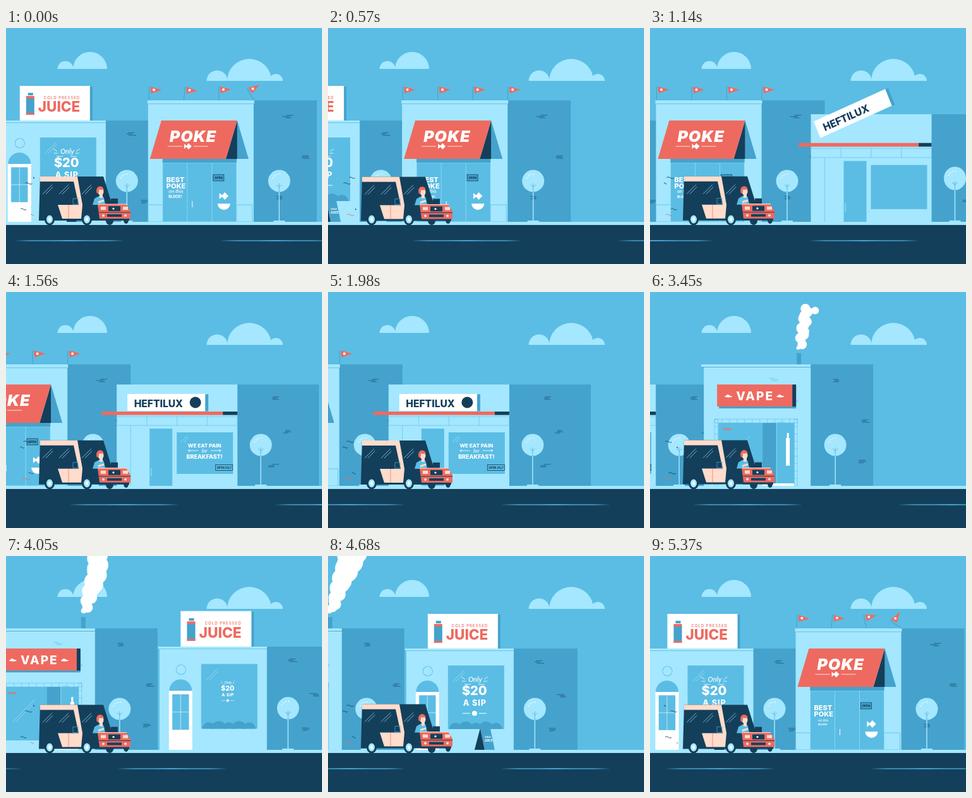
Write an HTML page with a canvas that moves like this. It is 500 px wide and 375 px high and loops after 5400 ms.

```html
<!DOCTYPE html>
<html lang="en">
<head>
<meta charset="utf-8">
<title>Street drive</title>
<style>
html, body { margin: 0; width: 100%; height: 100%; overflow: hidden; background: #5bbde4; }
canvas { display: block; }
</style>
</head>
<body>
<canvas id="stage" width="500" height="375"></canvas>
<script>
const c = document.getElementById('stage').getContext('2d');
const SKY = '#5bbde4', MID = '#45a2cc', PALE = '#a4e7fe', NAVY = '#143f5b',
      RED = '#ee6a60', PEACH = '#ffdccb', WHITE = '#fff';
const LOOP = 5400, SPEED = 1020 / LOOP, BIRTH_X = 323, GROUND = 308;
const SANS = 'Inter, Lato, sans-serif', SCRIPT = 'Lato, sans-serif';

const mod = (a, n) => ((a % n) + n) % n;
const clamp = v => Math.max(0, Math.min(1, v));
const part = (t, start, dur) => clamp((t - start) / dur);
const ease = p => 1 - (1 - p) ** 3;
const back = p => 1 + 2.7 * (p - 1) ** 3 + 1.7 * (p - 1) ** 2;
const pop = (t, start, dur) => t < start ? 0 : back(part(t, start, dur));
const random = seed => () => mod(Math.sin(seed++ * 12.9898) * 43758.5453, 1);

function rect(x, y, w, h, color) { c.fillStyle = color; c.fillRect(x, y, w, h); }
function frame(x, y, w, h, color) { c.strokeStyle = color; c.lineWidth = .8; c.strokeRect(x, y, w, h); }
function poly(color, ...p) {
  c.beginPath();
  for (let i = 0; i < p.length; i += 2) c.lineTo(p[i], p[i + 1]);
  c.fillStyle = color; c.fill();
}
function line(color, w, x1, y1, x2, y2) {
  c.beginPath(); c.moveTo(x1, y1); c.lineTo(x2, y2);
  c.strokeStyle = color; c.lineWidth = w; c.stroke();
}
function oval(x, y, rx, ry, color, from = 0, to = 2 * Math.PI) {
  c.beginPath(); c.ellipse(x, y, rx, ry, 0, from, to); c.fillStyle = color; c.fill();
}
const dot = (x, y, r, color) => oval(x, y, r, r, color);
const dome = (x, y, r, color) => oval(x, y, r, r, color, Math.PI);
const bowl = (x, y, r, color) => oval(x, y, r, r, color, 0, Math.PI);
function grid(x, y, w, h, cols, rows, color) {
  for (let i = 0; i <= cols; i++) line(color, .6, x + w * i / cols, y, x + w * i / cols, y + h);
  for (let i = 0; i <= rows; i++) line(color, .6, x, y + h * i / rows, x + w, y + h * i / rows);
}
function text(s, x, y, size, color, { weight = 800, space = 0, style = '', align = 'center', font = SANS } = {}) {
  c.font = `${style} ${weight} ${size}px ${font}`;
  c.letterSpacing = space + 'px'; c.textAlign = align; c.fillStyle = color;
  c.fillText(s, x, y);
}
const script = (s, x, y, size) => text(s, x, y, size, WHITE, { weight: 500, style: 'italic', font: SCRIPT });
// Draw with the origin at (x, y), scaled and turned.
function at(x, y, k, draw, turn = 0, kx = k) {
  if (k <= 0) return;
  c.save(); c.translate(x, y); c.rotate(turn); c.scale(kx, k); draw(); c.restore();
}
// Draw once as is and once flipped left to right.
function twice(draw) { draw(); c.save(); c.scale(-1, 1); draw(); c.restore(); }

function fish(x, y, k) {
  at(x, y, k, () => { poly(WHITE, -3, 0, 1, -5, 6, 0, 1, 5); poly(WHITE, -6, -4, -1, 0, -6, 4); });
}
function gleam(x, y, s) {
  line(PALE, .7, x, y + s, x + s, y);
  line(PALE, .7, x + 5, y + s, x + 5 + s * .75, y + s * .25);
}
function openSign(x, y) {
  rect(x, y, 17, 10, MID); frame(x, y, 17, 10, NAVY);
  text('OPEN', x + 8.5, y + 7, 4.6, NAVY);
}
function bricks(x, y, w, h, seed, color = NAVY) {
  const rnd = random(seed);
  for (let i = 0; i < 3; i++) {
    const bx = x + 12 + rnd() * (w - 24), by = y + h * (i + .4) / 3;
    for (let row = -2; row <= 2; row += 2) {
      const sx = bx - 9 + rnd() * 8;
      line(color, .6, sx, by + row, sx + 7 + rnd() * 5, by + row);
    }
  }
}
function tree(x, t) {
  at(x, GROUND, pop(t, 200, 150), () => {
    rect(-9, -2, 18, 3, PALE);
    dot(0, -65, 17.5, PALE);
    line(PALE, 1.5, 0, -50, 0, 0);
    line(SKY, 1, 0, -61, 0, -47);
    twice(() => line(SKY, 1, 0, -55, 4, -59));
    for (let a = 3.6; a < 5.2; a += .4) dot(11 * Math.cos(a), -65 + 11 * Math.sin(a), .9, WHITE);
  });
}
function walls(front, side, top, seed) {
  rect(front, top, side, GROUND - top, MID);
  bricks(front, top, side, GROUND - top, seed);
  rect(0, top, front, GROUND - top, PALE);
}

function juice(t) {
  walls(170, 101, 147, 4);
  rect(-2, 147, 172, 3, PALE);
  line(SKY, .8, 0, 150.5, 170, 150.5);
  dot(34, 183, 8, SKY); dot(34, 183, 7.2, PALE);
  dome(33.5, 216, 18, SKY);
  rect(15, 216, 37, 92, WHITE);
  rect(20, 221, 27, 56, SKY);
  grid(20, 221, 27, 56, 2, 2, WHITE);
  rect(66, 174, 89, 101, SKY);
  for (let i = 0; i < 5; i++) dome(78 + 16 * i, 275, 10 + 2 * (i % 2), MID);
  gleam(74, 181, 18);
  at(108, 210, pop(t, 400, 180), () => {
    script('Only', 1, -10, 11);
    twice(() => {
      line(WHITE, .8, 21, -18, 15, -14);
      line(WHITE, .8, 20, -11, 14, -11);
      line(WHITE, .8, 6, -6, 16, -6);
      line(WHITE, 1, 7, 40, 19, 40);
    });
    text('$20', 0, 11, 20, WHITE);
    text('A SIP', .5, 28, 12.5, WHITE, { space: 1 });
    dot(0, 40, 4, WHITE);
  });
  at(123, GROUND, pop(t, 460, 150), () => {
    poly(MID, -6, -34, 10, -34, 17, 0, 1, 0);
    poly(NAVY, -6, -34, 1, 0, -15, 0);
    text('COLD', 6, -19, 3.5, WHITE);
    text('JUICE', 7, -13, 4.5, WHITE);
  });
  at(90, 147, pop(t, 240, 200), () => {
    rect(55, -54, 4, 54, MID);
    rect(-56, -55, 111, 55, WHITE);
    rect(-43, -44, 8, 4, MID);
    rect(-46, -36, 13, 27, MID);
    rect(-46, -39, 13, 4, RED);
    rect(-46, -12, 13, 3, RED);
    text('COLD PRESSED', -18, -34, 6, RED, { weight: 500, space: 1, align: 'left' });
    text('JUICE', -27, -14, 22.5, RED, { align: 'left' });
  });
  tree(203.5, t);
}

function flag(i, t) {
  const start = 308 + 60 * i;
  const lean = back(part(t, start, 260)) - 1;
  at(1 + 55.5 * i, 115, pop(t, start - 160, 140), () => {
    line(MID, 1, 0, 0, 0, -22);
    poly(RED, 2, -22, 20, -17, 3, -11);
    dot(7.5, -17, 2, WHITE);
  }, lean);
}
function poke(t) {
  walls(167, 100, 115, 9);
  for (let i = 0; i < 4; i++) flag(i, t);
  rect(-1, 115, 169, 5, PALE);
  line(SKY, .8, 0, 120.5, 167, 120.5);
  for (const x of [0, 140]) frame(x, 281, 25, 27, SKY);
  rect(23, 208, 117, 100, SKY);
  grid(23, 214, 117, 94, 3, 1, PALE);
  rect(23, 208, 117, 6, MID);
  line(WHITE, 1, 70, 275, 70, 285);
  openSign(103, 233);
  at(29, 240, pop(t, 340, 110), () => {
    text('BEST', 0, 4.5, 11, WHITE, { align: 'left' });
    text('POKE', 0, 15, 11, WHITE, { align: 'left' });
  });
  at(43, 267, pop(t, 470, 90), () => {
    script('on this', 1, -5, 7.5);
    text('BLOCK!', 0, 3, 5, WHITE);
  });
  fish(120, 267, pop(t, 360, 110) * 1.2);
  bowl(120, 279, 10, WHITE);
  at(0, 147, pop(t, 220, 230), () => {
    poly(MID, 141, 0, 159, 61, 141, 61);
    poly(NAVY, 141, 0, 141, 61, 123, 61);
    poly(RED, 21, 0, 141, 0, 123, 61, 3, 61);
    text('POKE', 34, 34, 25, WHITE, { weight: 900, style: 'italic', space: 1, align: 'left' });
    at(63, 41, 1, () => twice(() => line(WHITE, .8, 9, 0, 32, 0)));
    fish(63, 41, 1);
  }, 0, 1);
  tree(207.5, t);
}

function gym(t) {
  walls(191, 129, 147, 15);
  grid(0, 198, 191, 14, 4, 1, SKY);
  line(SKY, .6, 22, 212, 22, 308);
  rect(52, 217, 36, 91, SKY);
  line(PALE, 1, 54.5, 280, 54.5, 293);
  rect(95, 223, 89, 66, SKY);
  const bar = 191 - 215 * ease(part(t, 190, 240)), tip = 191 - 23 * ease(part(t, 260, 200));
  rect(bar, 190, tip - bar, 5.5, RED);
  rect(tip, 190, 191 - tip, 5.5, NAVY);
  at(139, 253, pop(t, 440, 180), () => {
    gleam(-38, -24, 10);
    text('WE EAT PAIN', 0, -6, 8.2, WHITE);
    script('for', 0, 2, 8);
    twice(() => {
      line(WHITE, .8, 10, -1, 26, -1);
      line(WHITE, .8, 23, -3, 26, -1);
      line(WHITE, .8, 23, 1, 26, -1);
    });
    text('BREAKFAST!', 0, 12, 9, WHITE);
    frame(17.5, 21.5, 27, 9, NAVY);
    text('OPEN 24/7', 31, 28, 4.4, NAVY);
  });
  const q = part(t, 180, 360), hop = Math.sin(Math.PI * q ** .6);
  at(78.5 - 14 * hop, 175.5 - 34 * hop, ease(part(t, 150, 90)), () => {
    rect(61.5, -13, 5, 27, MID);
    rect(-61.5, -13.5, 123, 27, WHITE);
    text('HEFTILUX', -51, 7, 15.6, NAVY, { align: 'left' });
    const r = 9 * pop(t, 470, 160);
    if (r > 0) dot(46, 0, r, NAVY);
  }, -.82 * (1 - q));
  tree(228, t);
}

function vape(t) {
  walls(169, 99, 115, 23);
  const stack = 14 + 4 * ease(part(t, 480, 150));
  rect(147, 115 - stack, 7, stack, MID);
  rect(-4, 115, 172, 4, PALE);
  line(MID, .8, -4, 119.5, 169, 119.5);
  bricks(45, 125, 110, 105, 6, SKY);
  grid(17, 202, 131, 6, 11, 1, SKY);
  for (const x of [17, 143]) grid(x, 202, 5, 106, 1, 9, SKY);
  rect(23, 208, 120, 85, SKY);
  rect(93, 208, 50, 98, MID);
  rect(115, 208, 28, 98, SKY);
  line(PALE, .8, 115, 208, 115, 305);
  gleam(38, 228, 36);
  rect(93, 304, 50, 4, WHITE);
  text('OPEN', 37, 219.5, 4.5, RED);
  rect(130, 232, 6, 44, WHITE);
  rect(131.5, 224, 3, 8, WHITE);
  const slide = 1 - ease(part(t, 300, 340)), fit = ease(part(t, 440, 200));
  at(21 - 58 * slide, 147, pop(t, 300, 150), () => {
    rect(3, 3, 122, 35, MID);
    rect(119, 0, 3 + 3 * fit, 35, NAVY);
    rect(0, 0, 119, 35, RED);
    for (const x of [18, 100]) { oval(x, 19, 6, 1.5, WHITE); dome(x - 1, 19, 3, WHITE); }
    at(60, 18, pop(t, 540, 160), () => text('VAPE', 0, 7, 19, WHITE, { space: 2 }));
  });
  tree(208, t);
}

// Puffs leave the chimney and lag behind it as they widen.
function smoke(t, x) {
  const first = 690;
  for (let e = first, i = 0; e < t; e += 45, i++) {
    const a = t - e, late = clamp((e - first) / 800), y = 92 - .115 * a;
    if (y < -50) continue;
    const r = 6 + a * (.003 + .014 * late) + Math.sin(i * 2.4);
    dot(x + a * (.018 + .024 * late) + 3 * Math.sin(i * 1.9), y, Math.min(r, a / 10), WHITE);
    if (i === 0) dot(x + a * .045, y + 3, 6, WHITE);
  }
}

function wheel(x) {
  oval(x, 304, 8, 9.5, NAVY);
  oval(x, 304, 5, 6.5, PALE);
  oval(x, 304, 2, 3, WHITE);
}
function driver() {
  poly(SKY, 137, 281, 140, 271, 147, 267, 154, 268, 160, 281);
  rect(148, 262, 5, 8, PEACH);
  oval(150, 260, 4.5, 6, PEACH);
  oval(145, 259, 2, 4, RED);
  dome(149, 257, 5.5, RED);
  line(PEACH, 3, 146, 277, 155, 274);
  line(NAVY, 2, 156, 269, 158, 280);
}
function van(t) {
  oval(164, 306, 6, 7, NAVY);
  oval(190, 305, 4, 6, NAVY);
  c.save();
  c.translate(0, .5 * Math.sin(t / 70));
  poly(NAVY, 54, 236, 154, 236, 168, 281, 168, 306, 52, 306);
  poly(PEACH, 54, 236, 113, 236, 121, 281, 119, 303, 89, 303, 82, 281, 115, 281, 107, 244, 54, 244);
  line(RED, .7, 99, 281, 99, 303);
  for (const x of [58, 84, 120]) gleam(x, 249, 15);
  frame(106, 271, 8, 9, MID);
  driver();
  rect(166, 271, 11, 9, NAVY);
  rect(147, 297, 48, 9, NAVY);
  poly(RED, 145, 280, 190, 280, 197, 291, 197, 303, 148, 303);
  line(PEACH, 1.2, 145, 280, 191, 280);
  rect(162, 283, 19, 8, NAVY);
  dot(170, 287, 1.6, WHITE);
  for (const x of [150, 185]) { rect(x, 284, 8, 5, PEACH); dot(x + 4, 298, 2, PEACH); }
  line(NAVY, 1, 147, 293, 197, 293);
  rect(160, 296, 23, 4, NAVY);
  c.restore();
  wheel(69);
  wheel(128);
}
function wind(t) {
  for (let i = 0; i < 4; i++) {
    const y = 238 + 9 * (i % 2) + 50 * (i >> 1);
    const p = mod(t / 450 + i * .37, 1), x = 44 - 22 * p, w = 6 * Math.sin(Math.PI * p);
    c.beginPath(); c.moveTo(x - w, y);
    c.bezierCurveTo(x - w / 2, y - 4, x + w / 2, y + 4, x + w, y);
    c.strokeStyle = i === 3 ? RED : NAVY; c.lineWidth = .9; c.stroke();
  }
}

const shops = [[juice, 1008], [poke, 1245], [gym, 470], [vape, 737]]
  .map(([draw, left]) => ({ draw, born: (left - BIRTH_X) / SPEED }));

function render(t) {
  rect(0, 0, 500, 375, SKY);
  dome(94, 65, 12.5, PALE); dome(133, 65, 27, PALE);
  dome(334, 84, 16.5, PALE); dome(385, 84, 35, PALE); dome(427, 84, 11, PALE);

  const row = shops.map(s => ({ draw: s.draw, age: mod(t - s.born, LOOP) })).sort((a, b) => b.age - a.age);
  for (const { draw, age } of row) {
    const x = BIRTH_X - SPEED * age;
    if (x < -340) continue;
    if (draw === vape) smoke(age, x + 150.5);
    at(x, GROUND, pop(age, 0, 480), () => { c.translate(0, -GROUND); draw(age); }, 0, 1);
  }
  rect(0, 308, 500, 5, PALE);
  rect(0, 313, 500, 62, NAVY);
  const gap = 325, dash = mod(15 - t * 6 * gap / LOOP, gap);
  for (let x = dash - gap; x < 500; x += gap) oval(x + 85.5, 338, 85.5, .9, MID);
  wind(t);
  van(t);
}

const begin = performance.now();
function tick() {
  render((performance.now() - begin) % LOOP);
  requestAnimationFrame(tick);
}
tick();
</script>
</body>
</html>
```
